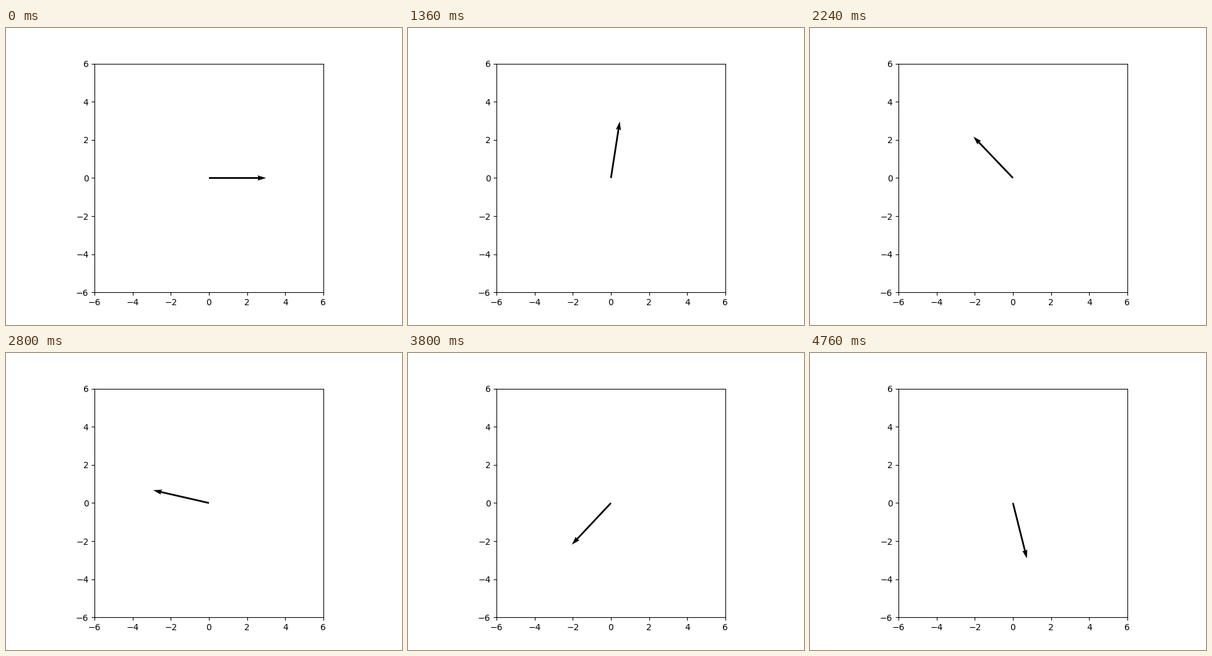
A matplotlib script that plays this animation: 640 px wide and 480 px high, repeating every 4800 ms.

```python
import numpy as np
import matplotlib.pyplot as plt
from matplotlib.animation import FuncAnimation

FRAMES = 120
INTERVAL = 40          # ms per frame
LENGTH = 3             # arrow length in data units
STEP = 1 / 24          # radians turned per frame

fig, ax = plt.subplots(figsize=(6.4, 4.8), dpi=100)
ax.set_xlim(-6, 6)
ax.set_ylim(-6, 6)
ax.set_aspect("equal")

arrow = ax.quiver(0, 0, LENGTH, 0, angles="xy", scale_units="xy", scale=1)


def update(i):
    angle = i * STEP
    arrow.set_UVC(LENGTH * np.cos(angle), LENGTH * np.sin(angle))
    return (arrow,)


anim = FuncAnimation(fig, update, frames=FRAMES, interval=INTERVAL,
                     repeat=True, repeat_delay=0)
plt.show()
```
